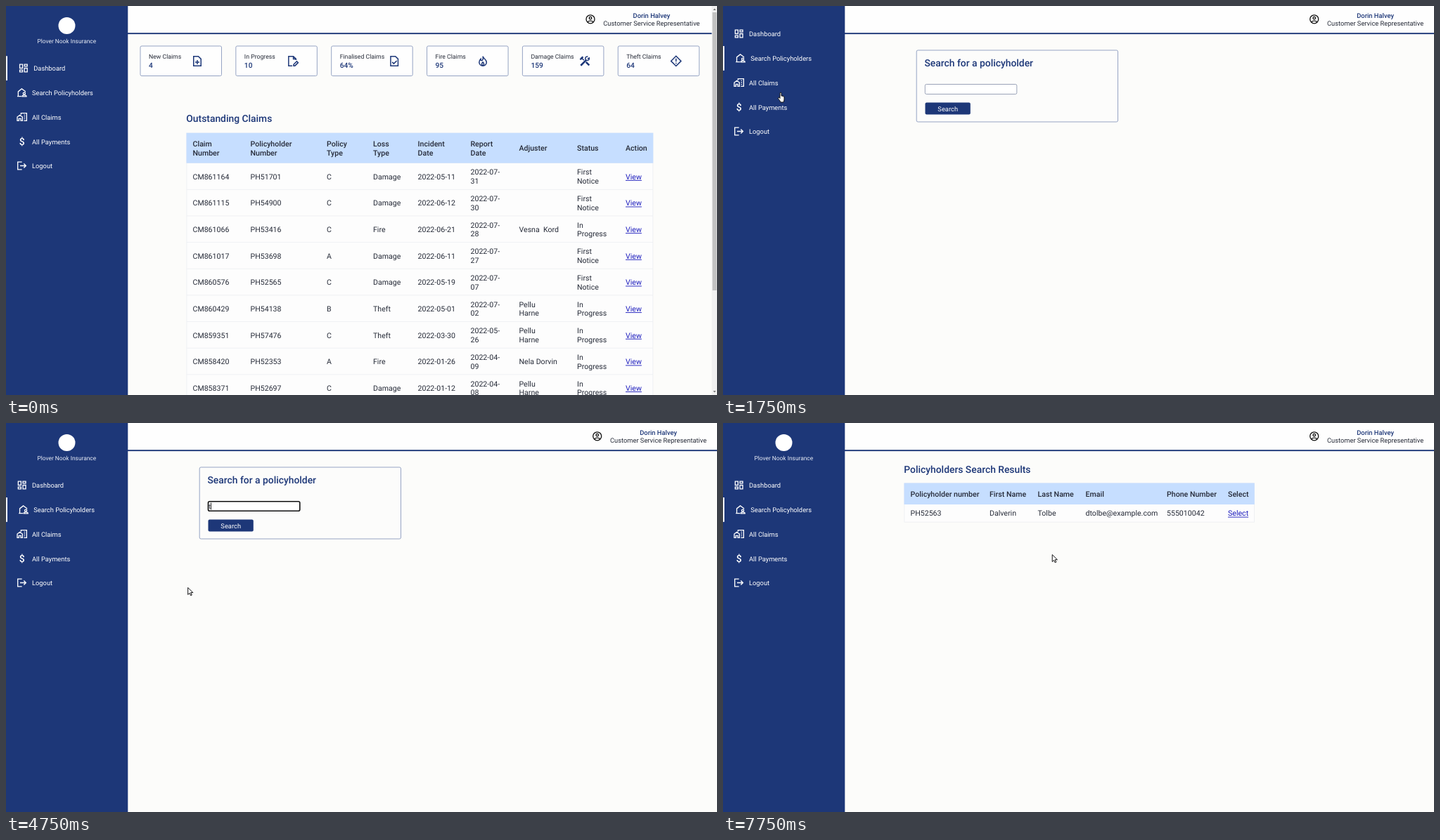
These frames come from a looping animation (1011 px wide and 554 px high, 8 s). An HTML page with a canvas:

```html
<!DOCTYPE html>
<html lang="en">
<head>
<meta charset="utf-8">
<title>Claims dashboard</title>
<style>
  html, body { margin: 0; width: 100%; height: 100%; overflow: hidden; background: #fcfcfa; }
  canvas { display: block; }
</style>
</head>
<body>
<canvas id="stage" width="1011" height="554"></canvas>
<script>
const ctx = document.getElementById('stage').getContext('2d');
const LOOP = 8000;
const NAVY = '#1d3778', INK = '#262b38', PALE = '#c6deff', LINE = '#ebedf1', EDGE = '#96a4c4', LINK = '#1b1bbd';

// Stroked icons on a 24-unit grid
const ICONS = {
  dashboard: 'M4 4h6v8H4ZM14 4h6v4h-6ZM14 12h6v8h-6ZM4 16h6v4H4Z',
  policyholder: 'M11 20H4V10L11.5 4 19 9.5V11M2 20H11M14.5 14a2.3 2.3 0 1 0 4.6 0a2.3 2.3 0 1 0-4.6 0M12.5 20.5c0-4 9-4 9 0Z',
  claims: 'M2 20V12L7.5 8 13 12V20H9.5V15.5H5.5V20ZM10 7V4H22V20H16M16.5 8h2M16.5 12h2M16.5 16h2',
  logout: 'M12 4H3V20H12M8 12H20M16 7.5L20.5 12 16 16.5',
  account: 'M3 12a9 9 0 1 0 18 0a9 9 0 1 0-18 0M9.4 9.5a2.6 2.6 0 1 0 5.2 0a2.6 2.6 0 1 0-5.2 0M6 18c3-3.2 9-3.2 12 0',
  add: 'M14 3H5V21H19V8ZM12 10V18M8 14H16',
  edit: 'M11 21H4V3H13L18 8V10M13 3V8H18M13.5 21V18.5L19.5 12.5 22 15 16 21Z',
  done: 'M14 3H5V21H19V8ZM8 14L11 17 16.5 11.5',
  fire: 'M12 3C13 7.5 19 9 19 14.5A7 6.5 0 0 1 5 14.5C5 11.5 6.5 9.5 8 8C8 10 9 11 10 11C12 11 13 7 12 3ZM12 14C9 16.5 9.5 20 12 20.5C14.5 20 15 16.5 12 14Z',
  tools: 'M4 20L14.5 9.5M5 21L15.5 10.5M20 20.5L14 14.5M21 19.5L15 13.5M10.5 10.5L5 5M3 9L8.5 3.5M4 9.5L9 4.5M18 3.5A3.8 3.8 0 1 0 20.5 6L17.5 8',
  warn: 'M12 2.5L21.5 12 12 21.5 2.5 12ZM12 7V13M12 15V17'
};
const POINTERS = {
  hand: 'M3 7.5V1.4Q3 .2 4 .2T5 1.4V5Q9 4.8 9 7V10Q9 12 8 14H4Q2.6 11 .8 9.2Q0 8 1 7.3Q2 7 3 8.6Z',
  arrow: 'M0 0V10L2.4 7.9 4 11.3 5.6 10.6 4 7.2H7.2Z'
};
const paths = Object.fromEntries(
  Object.entries({ ...ICONS, ...POINTERS }).map(([name, d]) => [name, new Path2D(d)]));

const MENU = [['dashboard', 'Dashboard'], ['policyholder', 'Search Policyholders'],
  ['claims', 'All Claims'], ['money', 'All Payments'], ['logout', 'Logout']];
const CARDS = [['New Claims', '4', 'add', 81], ['In Progress', '10', 'edit', 81],
  ['Finalised Claims', '64%', 'done', 89.5], ['Fire Claims', '95', 'fire', 79.5],
  ['Damage Claims', '159', 'tools', 88.5], ['Theft Claims', '64', 'warn', 82.5]];
const CLAIM_COLUMNS = [265.5, 347.5, 456, 522, 585.5, 660.5, 729.5, 812, 881];
const CLAIM_HEADS = ['Claim|Number', 'Policyholder|Number', 'Policy|Type', 'Loss|Type',
  'Incident|Date', 'Report|Date', 'Adjuster', 'Status', 'Action'];
const CLAIMS = [
  'CM861164,PH51701,C,Damage,2022-05-11,2022-07-|31,',
  'CM861115,PH54900,C,Damage,2022-06-12,2022-07-|30,',
  'CM861066,PH53416,C,Fire,2022-06-21,2022-07-|28,Vesna \u00a0Kord',
  'CM861017,PH53698,A,Damage,2022-06-11,2022-07-|27,',
  'CM860576,PH52565,C,Damage,2022-05-19,2022-07-|07,',
  'CM860429,PH54138,B,Theft,2022-05-01,2022-07-|02,Pellu|Harne',
  'CM859351,PH57476,C,Theft,2022-03-30,2022-05-|26,Pellu|Harne',
  'CM858420,PH52353,A,Fire,2022-01-26,2022-04-|09,Nela Dorvin',
  'CM858371,PH52697,C,Damage,2022-01-12,2022-04-|08,Pellu|Harne'
].map(row => row.split(','));
const RESULT_COLUMNS = [266.5, 379, 447.5, 515.5, 631, 718];
const RESULT_HEADS = ['Policyholder number', 'First Name', 'Last Name', 'Email', 'Phone Number', 'Select'];
const RESULT = ['PH52563', 'Dalverin', 'Tolbe', 'dtolbe@example.com', '555010042', 'Select'];

// [start time, value...]; the latest entry that has started applies
const POINTER_KEYS = [[0], [500, 'hand', 86, 157], [750, 'hand', 84, 114], [1000, 'hand', 76, 121],
  [1250, 'hand', 78, 123], [2250, 'hand', 291, 152], [2500, 'arrow', 299.5, 125],
  [3000, 'arrow', 246, 148.5], [3250, 'arrow', 258.7, 234.4], [7000, 'arrow', 259.2, 234.4],
  [7250, 'arrow', 319.5, 237.5], [7500, 'arrow', 321, 225.5], [7750, 'arrow', 468.2, 187.5]];
const HOVER_KEYS = [[0, -1], [500, 3], [750, 1]];
const TYPING_KEYS = [[0, ''], [4750, 't'], [5000, 'tol'], [5250, 'tolb'], [5500, 'tolbe']];
const at = (keys, t) => keys.findLast(key => key[0] <= t).slice(1);

function rect(x, y, w, h, fill) {
  ctx.fillStyle = fill;
  ctx.fillRect(x, y, w, h);
}

function box(x, y, w, h, { fill, stroke, width = 1, radius = 2 }) {
  ctx.beginPath();
  ctx.roundRect(x, y, w, h, radius);
  if (fill) { ctx.fillStyle = fill; ctx.fill(); }
  if (stroke) { ctx.strokeStyle = stroke; ctx.lineWidth = width; ctx.stroke(); }
}

// y is the middle of the capital letters
function text(s, x, y, size = 10.6, color = INK, weight = 400, align = 'left') {
  ctx.font = `${weight} ${size}px Roboto, sans-serif`;
  ctx.textAlign = align;
  ctx.fillStyle = color;
  ctx.fillText(s, x, y + size * 0.355);
  return ctx.measureText(s).width;
}

function cell(s, x, y, weight, color = INK) {
  const lines = s.split('|');
  lines.forEach((line, i) => text(line, x, y + (i - (lines.length - 1) / 2) * 12.7, 10.6, color, weight));
}

function link(s, x, y) {
  const width = text(s, x, y, 10.6, LINK);
  rect(x, y + 5, width, 0.9, LINK);
}

function icon(name, x, y, size, color) {
  ctx.save();
  ctx.translate(x - size / 2, y - size / 2);
  ctx.scale(size / 24, size / 24);
  ctx.strokeStyle = color;
  ctx.lineWidth = 2;
  ctx.stroke(paths[name]);
  ctx.restore();
}

function sidebar(t) {
  const active = t < 1750 ? 0 : 1;
  const hasLogo = t < 1750 || t >= 2000;
  const top = hasLogo ? 71.3 : 22.3;
  const hover = t < 1750 ? at(HOVER_KEYS, t)[0] : -1;
  rect(0, 0, 173.3, 554, NAVY);
  if (hasLogo) {
    ctx.beginPath();
    ctx.arc(86.5, 28, 12, 0, 7);
    ctx.fillStyle = '#fff';
    ctx.fill();
    text('Plover Nook Insurance', 86.3, 50.3, 8.4, '#e8ecf5', 400, 'center');
  }
  MENU.forEach(([name, label], i) => {
    const y = top + i * 34.75, mid = y + 17.4, shift = i === active ? 2.2 : 0;
    if (i === hover) rect(0, y, 173.3, 34.75, '#257cb3');
    if (i === active) rect(0, y, 2, 34.75, '#fff');
    if (name === 'money') text('$', 22.7, mid, 14, '#fff', 500, 'center');
    else icon(name, 22.7 + shift, mid - 0.2, 16, '#fff');
    text(label, 37 + shift, mid + 0.3, 9.33, '#fff');
  });
}

function header(right) {
  rect(173, 0, right - 173, 39, '#fefefe');
  rect(173, 38.2, right - 173, 1.9, NAVY);
  icon('account', right - 170.3, 18.8, 16, '#111');
  text('Dorin Halvey', right - 83.4, 13.4, 9.33, NAVY, 500, 'center');
  text('Customer Service Representative', right - 83.4, 24.2, 9.33, INK, 400, 'center');
}

function scrollbar() {
  rect(1003.5, 0, 7.5, 554, '#f1f1f1');
  rect(1004.5, 9, 6, 396, '#c1c1c1');
  ctx.fillStyle = '#777';
  ctx.fill(new Path2D('M1005.5 6L1007.5 3.5 1009.5 6ZM1005.5 548L1007.5 550.5 1009.5 548Z'));
}

function dashboardPage() {
  header(1001.3);
  rect(1001, 0, 3, 38.2, '#fefefe');
  rect(1001, 38.2, 3, 1.9, NAVY);
  CARDS.forEach(([label, value, name, iconX], i) => {
    const x = 191 + i * 135.85;
    box(x, 57, 115.5, 42.5, { fill: '#fefefe', stroke: EDGE });
    text(label, x + 12, 72, 8.7);
    text(value, x + 12, 84, 10.2, NAVY, 500);
    icon(name, x + iconX, 78.4, 18, NAVY);
  });
  text('Outstanding Claims', 256.3, 160.5, 13.85, NAVY, 500);
  rect(256.5, 180.7, 663.8, 373.3, LINE);
  rect(256.5, 180.7, 663.8, 43, PALE);
  CLAIM_HEADS.forEach((head, i) => cell(head, CLAIM_COLUMNS[i], 202.6, 500));
  CLAIMS.forEach((row, i) => {
    const y = 224 + i * 37.65, mid = y + 18.9;
    rect(257.3, y, 662.2, 36.9, '#fdfdfd');
    row.forEach((value, col) => cell(value, CLAIM_COLUMNS[col], mid));
    cell(row[6] ? 'In|Progress' : 'First|Notice', CLAIM_COLUMNS[7], mid);
    link('View', CLAIM_COLUMNS[8], mid);
  });
  scrollbar();
}

function searchPage(t) {
  const focused = t >= 2750, typed = at(TYPING_KEYS, t)[0];
  box(275.2, 63, 286.3, 102, { fill: '#fcfcfb', stroke: EDGE });
  text('Search for a policyholder', 286.5, 81.2, 13.85, NAVY, 500);
  if (focused) box(287.5, 111.7, 130.3, 13.6, { fill: '#fff', stroke: '#111', width: 1.6 });
  else box(287.3, 111.5, 130.5, 14, { fill: '#fff', stroke: '#9099b0', width: 0.9 });
  if (typed) {
    const width = text(typed, 288, 118.5, 9.33);
    rect(288 + width, 113.5, 0.9, 10, '#111');
  }
  box(287.5, 137.4, 64.3, 17.2, { fill: NAVY });
  text('Search', 319.7, 146.3, 9.33, '#fff', 400, 'center');
}

function resultsPage() {
  text('Policyholders Search Results', 257.3, 65.6, 13.85, NAVY, 500);
  rect(257.5, 85.5, 498.3, 56, LINE);
  rect(257.5, 85.5, 498.3, 30.5, PALE);
  rect(258.3, 116, 496.7, 24.8, '#fdfdfd');
  RESULT_COLUMNS.forEach((x, i) => {
    text(RESULT_HEADS[i], x, 100.9, 10.6, INK, 500);
    (i === 5 ? link : text)(RESULT[i], x, 128.6);
  });
}

function statusBar() {
  box(-1, 542.3, 239, 13, { fill: '#dee1e6', stroke: '#c3c6cb', width: 0.7 });
  text('localhost:8081/claims-management-system/dashboard/searchPolicyholders', 2, 548.8, 6.8, '#43464b');
}

function pointer(t) {
  const [shape, x, y] = at(POINTER_KEYS, t);
  if (!shape) return;
  ctx.save();
  ctx.translate(x, y);
  ctx.fillStyle = '#fff';
  ctx.strokeStyle = '#111';
  ctx.lineWidth = 1;
  ctx.fill(paths[shape]);
  ctx.stroke(paths[shape]);
  ctx.restore();
}

function draw(now) {
  const t = now % LOOP;
  ctx.textRendering = 'geometricPrecision';
  rect(0, 0, 1011, 554, '#fcfcfa');
  if (t < 1750) dashboardPage();
  else {
    header(1011);
    if (t < 6000) searchPage(t);
    else resultsPage();
  }
  sidebar(t);
  if (t >= 1000 && t < 1750) statusBar();
  pointer(t);
}

const start = performance.now();
function frame() {
  draw(performance.now() - start);
  requestAnimationFrame(frame);
}
frame();
</script>
</body>
</html>
```
